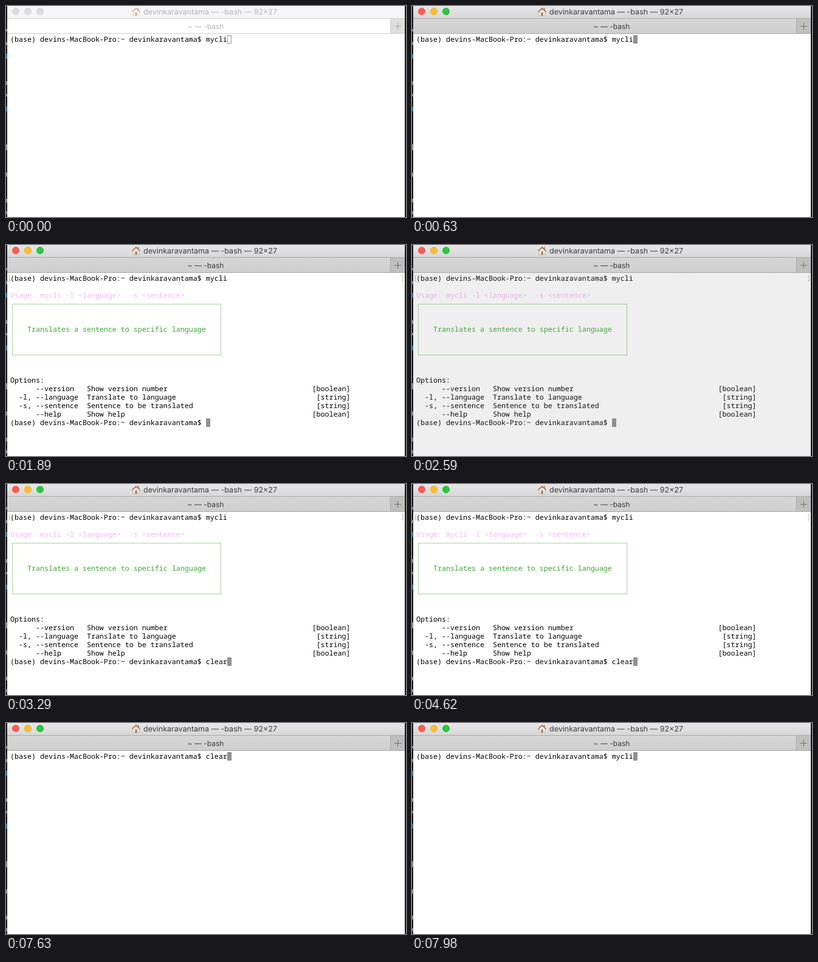
Recreate the animation shown at these times as an HTML page. Size 658x348 px, loop 8000 ms.

```html
<!DOCTYPE html>
<html lang="en">
<head>
<meta charset="utf-8">
<title>Terminal</title>
<style>
  html, body { margin: 0; width: 100%; height: 100%; overflow: hidden; background: #fff; }
  svg { display: block; width: 658px; height: 348px; text-rendering: geometricPrecision; }
  text { white-space: pre; }
  .mono { font: 500 11.6667px "Noto Sans Mono", "DejaVu Sans Mono", monospace; }
  .ui { font-family: Inter, "Liberation Sans", sans-serif; fill: #3c3c3c; }
  .bar { fill: url(#titleShade); }
  .tab { fill: url(#tabShade); }
  .add { fill: #bfbfbf; }
  .rule { fill: #a9a9a9; }
  .plus { stroke: #6f6f6f; }
  .blur .ui { fill: #b4b4b4; }
  .blur .bar { fill: #f6f6f6; }
  .blur .tab { fill: #fff; }
  .blur .add { fill: #dedede; }
  .blur .rule { fill: #d2d2d2; }
  .blur .plus { stroke: #a6a6a6; }
  .blur .light { fill: #dcdcdc; stroke: #d0d0d0; }
  .blur .house { opacity: .5; }
</style>
</head>
<body>
<svg viewBox="0 0 658 348">
  <defs>
    <linearGradient id="titleShade" x2="0" y2="1">
      <stop stop-color="#e7e7e7"/><stop offset="1" stop-color="#d7d7d7"/>
    </linearGradient>
    <linearGradient id="tabShade" x2="0" y2="1">
      <stop stop-color="#d6d6d6"/><stop offset="1" stop-color="#cfcfcf"/>
    </linearGradient>
  </defs>

  <rect width="658" height="348" fill="#17181c"/>
  <g id="behind"></g>
  <rect x="2" width="654" height="348" fill="#fff"/>

  <g id="screen" class="mono">
    <path id="marks" d="M7.5 50.5h-2v9h2M651 50.5h2v9h-2" fill="none" stroke="#b5b5b5"/>
    <g id="help">
      <rect x="10.5" y="97.5" width="343" height="84" fill="none" stroke="#a6d49c"/>
    </g>
    <rect id="cursor"/>
    <text id="topLine" x="7" y="59"></text>
    <text id="lastLine" x="7" y="297"></text>
  </g>
  <rect id="bell" x="2" y="46" width="654" height="302" fill="#808080"/>

  <g id="chrome">
    <rect class="bar" x="2" width="654" height="20"/>
    <rect class="tab" x="2" y="21" width="630" height="24"/>
    <rect class="add" x="632" y="21" width="24" height="24"/>
    <rect class="rule" x="2" y="20" width="654" height="1"/>
    <rect class="rule" x="2" y="45" width="654" height="1"/>
    <rect class="rule" x="632" y="21" width="1" height="24"/>
    <path class="plus" d="M639 33.5h11M644.5 28v11"/>
    <circle class="light" cx="16" cy="9" r="5.7" fill="#fc5b57" stroke="#e24b47" stroke-width=".6"/>
    <circle class="light" cx="36" cy="9" r="5.7" fill="#fdbc2f" stroke="#dfa023" stroke-width=".6"/>
    <circle class="light" cx="56" cy="9" r="5.7" fill="#29c840" stroke="#1dac2c" stroke-width=".6"/>
    <g class="house">
      <path d="M209 9.5L214 5l5 4.500V16h-10z" fill="#f1eee6" stroke="#a39b90" stroke-width=".6"/>
      <path d="M207.300 10L214 3.600l6.700 6.400" fill="none" stroke="#a87358" stroke-width="1.700"/>
      <path d="M217 3.500h1.600v4l-1.600-1.600z" fill="#a87358"/>
      <rect x="212.500" y="10.500" width="3" height="5.500" fill="#96705a"/>
    </g>
    <text id="title" class="ui" x="226" y="14" font-size="12.5"></text>
    <text class="ui" x="328.500" y="38" font-size="12" text-anchor="middle">~ — -bash</text>
  </g>
</svg>
<script>
const LOOP = 8000, STEP = 70, CELL = 7, ROW = 14, LEFT = 7, TOP = 48;
const USER = "devinkaravantama";
const PROMPT = `(base) devins-MacBook-Pro:~ ${USER}$ `;
const $ = id => document.getElementById(id);

function add(parent, tag, attrs, content = "") {
  const node = document.createElementNS("http://www.w3.org/2000/svg", tag);
  set(node, attrs);
  node.textContent = content;
  parent.append(node);
}

function set(node, attrs) {
  for (const key in attrs) node.setAttribute(key, attrs[key]);
}

function show(node, visible) {
  node.style.display = visible ? "" : "none";
}

function printLine(row, content, fill = "#000") {
  add($("help"), "text", { x: LEFT, y: TOP + ROW * row + 11, fill }, content);
}

function option(row, flags, description, type) {
  printLine(row, flags.padEnd(18) + description.padEnd(62 - type.length) + type);
}

$("title").textContent = `${USER} — -bash — 92×27`;
printLine(2, "Usage: mycli -l <language>  -s <sentence>", "#f2b8f2");
printLine(6, "    Translates a sentence to specific language", "#3ea633");
printLine(12, "Options:");
option(13, "      --version", "Show version number", "[boolean]");
option(14, "  -l, --language", "Translate to language", "[string]");
option(15, "  -s, --sentence", "Sentence to be translated", "[string]");
option(16, "      --help", "Show help", "[boolean]");

// Slivers of the window behind, visible along the left edge
[[40, 4], [62, 5], [127, 6], [147, 4], [233, 10], [278, 7], [321, 6], [341, 5]].forEach(([y, height]) =>
  add($("behind"), "rect", { x: 0, y: y - height / 2, width: 1.5, height, fill: "#a9abb0" }));
[83, 170].forEach(y =>
  add($("behind"), "rect", { x: 0, y: y - 4, width: 1.5, height: 8, fill: "#3f86b8" }));

function placeCursor(row, column, hollow) {
  const inset = hollow ? 0.5 : 0;
  set($("cursor"), {
    x: LEFT + CELL * column + inset,
    y: TOP + ROW * row + inset,
    width: CELL - 2 * inset,
    height: ROW - 2 * inset,
    fill: hollow ? "none" : "#919191",
    stroke: hollow ? "#999" : "none"
  });
}

// Two presses of the up arrow recall two commands of equal length
function recalled(t, first, second, start) {
  return t < start ? "" : t < start + 210 ? first : second;
}

function render(t) {
  const focused = t >= 630;
  const entered = t >= 1260 && t < 7070;
  const printed = t >= 1330 && entered;
  const ready = t >= 1400 && entered;
  const command = t < 7070 ? "mycli" : recalled(t, "clear", "mycli", 7630);
  const next = recalled(t, "mycli", "clear", 3080);

  $("chrome").setAttribute("class", focused ? "" : "blur");
  $("topLine").textContent = PROMPT + command;
  $("lastLine").textContent = ready ? PROMPT + next : "";
  show($("marks"), entered);
  show($("help"), printed);

  if (ready) placeCursor(17, PROMPT.length + next.length);
  else if (printed) placeCursor(17, 0);
  else if (entered) placeCursor(1, 0);
  else placeCursor(0, PROMPT.length + command.length, !focused);

  const flash = Math.floor((t - 2590) / STEP);
  $("bell").setAttribute("opacity", flash >= 0 && flash < 5 ? 0.125 * (1 - flash / 5) : 0);
}

const start = performance.now();
function tick() {
  render((performance.now() - start) % LOOP);
  requestAnimationFrame(tick);
}
tick();
</script>
</body>
</html>
```
